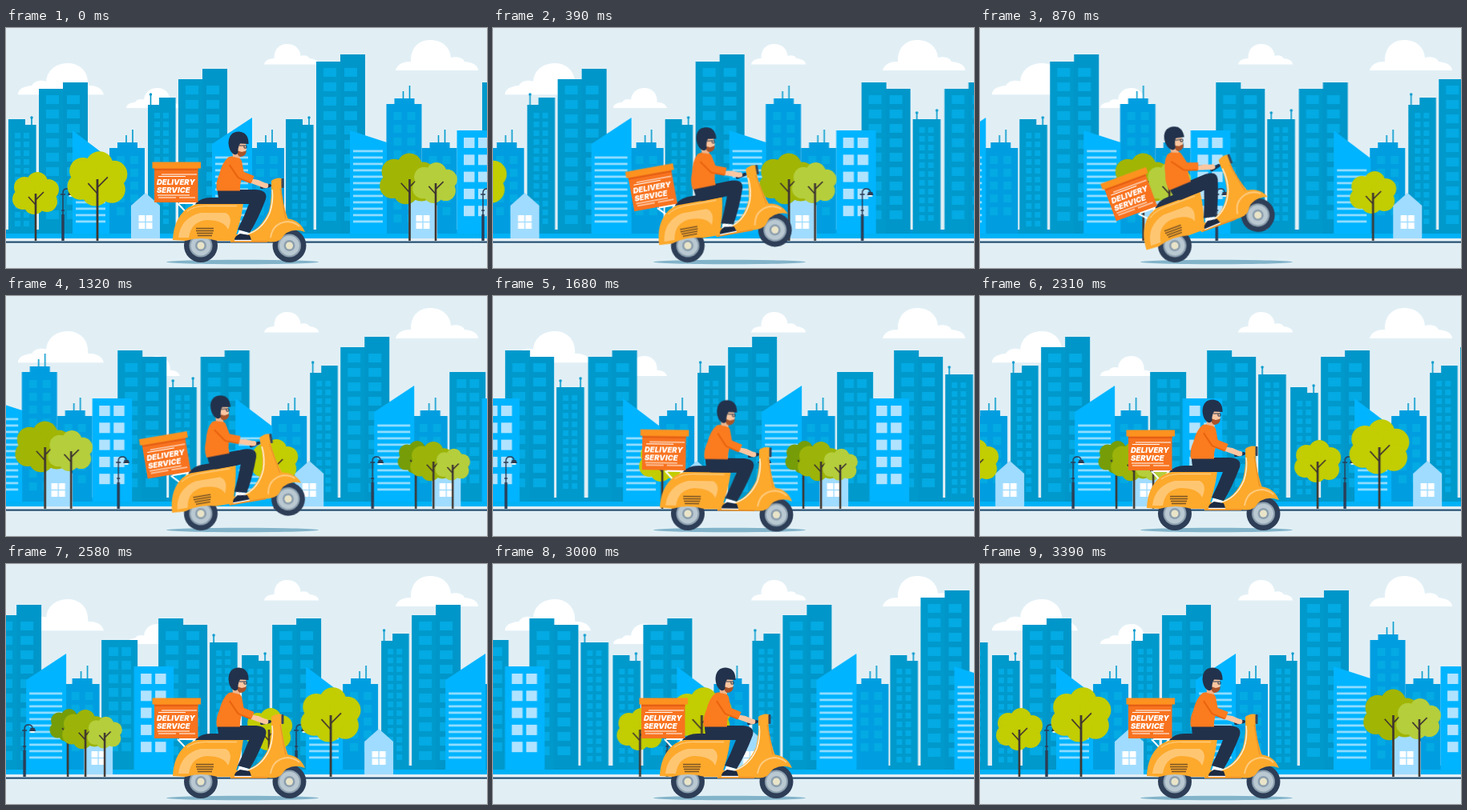
An HTML page that plays this animation: 600x300 px, repeating every 3.42 s.

```html
<!DOCTYPE html>
<html lang="en">
<head>
<meta charset="utf-8">
<title>Delivery scooter</title>
<style>
html, body { margin: 0; width: 100%; height: 100%; overflow: hidden; background: #e1eff5; }
svg { display: block; width: 100vw; height: 100vh; }
#ride { transform-origin: 243px 272px; }
#rider { transform-origin: 295px 262px; }
#head { transform-origin: 285px 162px; }
text { font: italic 900 9.5px Inter, "Open Sans", sans-serif; fill: #fff; }
</style>
</head>
<body>
<svg viewBox="0 0 600 300">
  <defs>
    <path id="cloud" fill="#fff" d="M0 38C2 30 10 27 19 27C18 10 29 0 43 0C58 0 68 9 69 22C76 20 84 22 86 27C95 28 103 31 103 38Z"/>
    <g id="wheel">
      <circle r="21" fill="#2e3e57"/>
      <circle r="14.5" fill="#8c9fae"/>
      <circle r="12.5" fill="#b9c8d1"/>
      <circle r="7" fill="#8c9fae"/>
      <circle r="4.5" fill="#e9e4c8"/>
    </g>
    <g id="city"></g>
  </defs>

  <rect width="600" height="300" fill="#e1eff5"/>
  <use href="#cloud" transform="translate(122 44) scale(-1.04 1.03)"/>
  <use href="#cloud" transform="translate(217 75) scale(-.65 .66)"/>
  <use href="#cloud" transform="translate(322 20) scale(.66 .67)"/>
  <use href="#cloud" transform="translate(486 15)"/>

  <rect y="252" width="600" height="6" fill="#0099d3"/>
  <rect y="266.6" width="600" height="2" fill="#1a4467"/>
  <g id="world">
    <use href="#city"/>
    <use href="#city" x="1180"/>
  </g>
  <ellipse cx="295" cy="292.5" rx="95" ry="2.8" fill="#82b3c9"/>

  <g id="ride">
    <path d="M214 219L231 237M216 219H246M236 219L226 231" fill="none" stroke="#fff" stroke-width="2"/>
    <use href="#wheel" x="243" y="272"/>
    <use href="#wheel" x="353.5" y="272"/>
    <path d="M280 258L300 257Q318 252 328 229Q332 212 331 196H343Q345 222 353 242Q342 262 325 268H280Z" fill="#fda92c"/>
    <path d="M342 200Q346 224 350 244Q341 259 326 266" fill="none" stroke="#e9922a" stroke-width="1.3"/>
    <path d="M332 202Q334 216 329 231Q319 254 298 258.5" fill="none" stroke="#fff0d8" stroke-width="1.6"/>
    <path d="M326 267Q326 239 350 238Q367 240 373 255Q353 248 343 264Q336 269 326 267Z" fill="#fda92c"/>
    <path d="M330 262Q333 243 352 242Q361 243 366 248" fill="none" stroke="#ffca7c" stroke-width="2"/>
    <path d="M208 265Q209 240 224 227Q234 219 248 219H296Q293 244 284 266H264Q243 260 224 266Z" fill="#fda92c"/>
    <path d="M215 262Q218 237 243 231H274Q284 236 277 252Q272 240 250 240Q231 242 228 262Z" fill="#ffc672"/>
    <path d="M226 229Q236 222 252 222.5H288" fill="none" stroke="#ffca7c" stroke-width="1.3"/>
    <path d="M237 250.5H259M237 253.5H259M238 256.5H258M239 259.5H257" stroke="#7a5424" stroke-width="1.3"/>
    <path d="M281 267H326" stroke="#e9922a" stroke-width="2"/>
    <path d="M236 220Q243 212 255 212H298V220Z" fill="#22314a"/>
    <path d="M331 191Q337 186 345 188V200L331 202Z" fill="#fda92c"/>
    <rect x="343.5" y="188" width="3" height="12" rx="1" fill="#3a4658"/>
    <path d="M319 199L329 197" stroke="#22314a" stroke-width="4" stroke-linecap="round"/>

    <path d="M185 175H239.5V218H185Z" fill="#f8731f"/>
    <path d="M185 175.5H239.5V178H185Z" fill="#e45f14"/>
    <path d="M182.5 167.5H243V175.5H182.5Z" fill="#fd921f"/>
    <path d="M194 183H238M190 185.5H224M189 209H229M190 212H212M216 212H236" stroke="#fff" stroke-width="1"/>
    <text x="188" y="195.5">DELIVERY</text>
    <text x="188" y="205.5">SERVICE</text>

    <g id="rider">
      <path d="M291 252L303 256L300 261H288Z" fill="#fff"/>
      <path d="M285 265Q285 260 292 257L304 259L306 265Z" fill="#1c2a42"/>
      <path d="M285 265.5H306" stroke="#fff" stroke-width="1.3"/>
      <path d="M264 202H312Q327 203 324 214Q315 238 304 256L289 252Q297 236 303 220H272Q264 219 264 202Z" fill="#22314a"/>
      <path d="M278 161Q290 158 294 166L297 182Q291 194 292 203.5H263Q261 194 266 183Q270 167 278 161Z" fill="#fb7b1f"/>
      <path d="M304 188L315 190L324 194L322 200L303 193Z" fill="#fbc6a0"/>
      <circle cx="324" cy="197" r="3.3" fill="#fbc6a0"/>
      <path d="M282 169L292 184L307 190" fill="none" stroke="#e9630f" stroke-width="9.5" stroke-linejoin="round"/>
      <path d="M283 168L293 183L308 189" fill="none" stroke="#fb7b1f" stroke-width="8.5" stroke-linejoin="round"/>
      <g id="head">
        <path d="M282 152H292V163L283 161Z" fill="#efb48c"/>
        <path d="M288 142H299L300 152L296 158H287Z" fill="#fbc6a0"/>
        <path d="M288 153L294 155L300 153.5Q299 161 292 161Q288 159 288 153Z" fill="#a9542a"/>
        <path d="M277.5 144Q278 129.5 290.5 129.5Q302 130.5 302.5 143V145L292 144.5Q289 149 289.5 156Q287 160 283 157Q278 153 277.5 144Z" fill="#22324c"/>
        <path d="M291 147H300M297 147V150H300V147" fill="none" stroke="#26364f" stroke-width="1"/>
      </g>
    </g>
  </g>
</svg>

<script>
const WALL = '#0099cc', SIDE = '#0096c9', MID = '#009ee0', PANE = '#03aae3',
      BRIGHT = '#00b4ff', STRIPE = '#8fdcff', PALE = '#b0e3ff', INK = '#2c3c54';
const out = [];
const rect = (x, y, w, h, fill) => out.push(`<rect x="${x}" y="${y}" width="${w}" height="${h}" fill="${fill}"/>`);
const shape = (d, fill) => out.push(`<path d="${d}" fill="${fill}"/>`);
const line = (d, color, w = 1.5) => out.push(`<path d="${d}" fill="none" stroke="${color}" stroke-width="${w}"/>`);
const dot = (x, y, r, fill) => out.push(`<circle cx="${x}" cy="${y}" r="${r}" fill="${fill}"/>`);
const wall = (x, y, w, fill) => rect(x, y, w, 258 - y, fill);

function panes(xs, y, w, h, pitch, fill = PANE, end = 248) {
  for (; y + h <= end; y += pitch) xs.forEach(x => rect(x, y, w, h, fill));
}
function mast(x, top, base, ball = true) {
  line(`M${x} ${top}V${base}`, WALL, 1.6);
  if (ball) dot(x, top, 1.7, WALL);
}
function tower(x, left, right) {
  wall(x, left, 31, WALL);
  wall(x + 30, right, 31, SIDE);
  panes([x + 9, x + 35], Math.max(left, right) + 8, 16, 11, 18);
}
function slim(x, left, right, split, masts) {
  masts.forEach(([dx, top]) => mast(x + dx, top, 125));
  wall(x, left, split, WALL);
  wall(x + split, right, 34.6 - split, WALL);
  panes([x + 8, x + 19], Math.max(left, right) + 10, 7, 7, 11);
}
function block(x, y) {
  mast(x + 21, y - 16, y, false);
  mast(x + 29, y - 23, y, false);
  rect(x + 10, y - 7, 25, 8, MID);
  wall(x, y, 44, MID);
  panes([x + 9, x + 26], y + 10, 10, 10, 16);
}
function slab(x) {
  wall(x, 95, 45, WALL);
  panes([x + 9, x + 25], 104, 12, 11, 17);
}
function slant(x, w, left, right, first) {
  shape(`M${x} ${left}L${x + w} ${right}V258H${x}Z`, BRIGHT);
  for (let y = first; y < 243; y += 8) rect(x + 4, y - .5, w - 9, 2.8, STRIPE);
}
function flats(x) {
  wall(x, 128, 49.5, BRIGHT);
  panes([x + 8.5, x + 26.5], 137, 13.5, 13, 21.3, PALE);
}
function house(x) {
  shape(`M${x - 18} 222L${x} 206L${x + 18} 222V263H${x - 18}Z`, '#a0dcff');
  for (const dx of [-8.5, .7]) for (const y of [234, 243.2]) rect(x + dx, y, 7.8, 7.8, '#fff');
}
function lamp(x) {
  line(`M${x} 266V206Q${x} 201 ${x + 5} 201Q${x + 10} 201 ${x + 10} 206`, INK);
  line(`M${x} 266V233`, INK, 3.4);
  line(`M${x - 3} 208H${x + 3}M${x - 2} 228H${x + 2}`, INK, 1.5);
  shape(`M${x + 7.5} 205H${x + 12.5}L${x + 14} 209H${x + 6}Z`, INK);
  rect(x + 7.5, 209, 5, 1.8, '#fff');
}
// Crown lobes: offset x, offset y, radius
const LOBES = [[0, 0, 17], [2, -14, 13], [-14, -8, 13], [16, -5, 13], [14, 10, 13], [-2, 13, 13], [-16, 7, 13]];
function tree(x, y, s, fill, trunk = x) {
  LOBES.forEach(([dx, dy, r]) => dot(x + dx * s, y + dy * s, r * s, fill));
  line(`M${trunk} 266V${y}`, '#3f3630', 2 + s * .6);
  line(`M${trunk} ${y + 14 * s}L${trunk - 9 * s} ${y + 4 * s}M${trunk} ${y + 8 * s}L${trunk + 10 * s} ${y - 2 * s}`, '#3f3630', 1.6);
}

block(129, 150); block(303, 150); block(474.5, 95);
block(518.5, 150); block(786, 150); block(961.5, 150);
slim(3, 114, 121, 21, [[29, 112]]);
slim(349, 114, 121, 21, [[29, 112]]);
slim(177, 96, 87, 14, [[3.5, 83]]);
slim(834, 96, 87, 14, [[3.5, 83]]);
slim(658, 114, 114, 17, [[5, 106], [30, 103]]);
slim(1143, 98, 98, 17, [[5, 89]]);
tower(41, 76, 68); tower(215, 64, 51); tower(387, 42, 33); tower(594, 68, 76);
tower(697.5, 76, 68); tower(872, 64, 51); tower(1079, 68, 76);
slab(1008);
slant(83, 46, 128, 163, 177); slant(429, 46, 128, 143, 153); slant(741, 46, 128, 163, 177);
slant(257, 50, 145, 112, 161); slant(914, 50, 145, 112, 161);
flats(562.5); flats(1048.5);
rect(0, 257, 1180, 6, '#00b2f6');
[174, 520, 833, 1004].forEach(house);
[71, 595, 912].forEach(lamp);
tree(37, 207, 1, '#c2cd02');
tree(114, 189, 1.29, '#c2cd02');
tree(501, 189, 1.2, '#a1b505', 503.5);
tree(535, 194, .96, '#b5ce3c', 536);
tree(790, 206, 1, '#c2cd02');
tree(966, 202, .78, '#769d08');
tree(986, 207, .93, '#9cb40a', 988);
tree(1012, 211, .75, '#b5ce3c');
document.getElementById('city').innerHTML = out.join('');

const timing = { duration: 3420, iterations: Infinity, easing: 'steps(114)', delay: -1 };
const play = (id, frames) => document.getElementById(id).animate(frames, timing);

// Wheelie: time in ms, nose-up angle in degrees, easing to the next step
const SWING = 'cubic-bezier(.37, 0, .63, 1)';
const wheelie = [
  [0, 0, SWING], [780, 20.5, SWING], [870, 20.2, SWING], [1780, -1.4, SWING],
  [1890, .5, SWING], [1980, 0, 'linear'], [3420, 0, 'linear']
];
const turn = k => wheelie.map(([ms, deg, easing]) => ({
  offset: ms / timing.duration, transform: `rotate(${-deg * k}deg)`, easing
}));

play('world', [{ transform: 'translateX(0px)' }, { transform: 'translateX(-1178.3px)' }]);
play('ride', turn(1));
play('rider', turn(.12));
play('head', turn(-.6));
</script>
</body>
</html>
```
